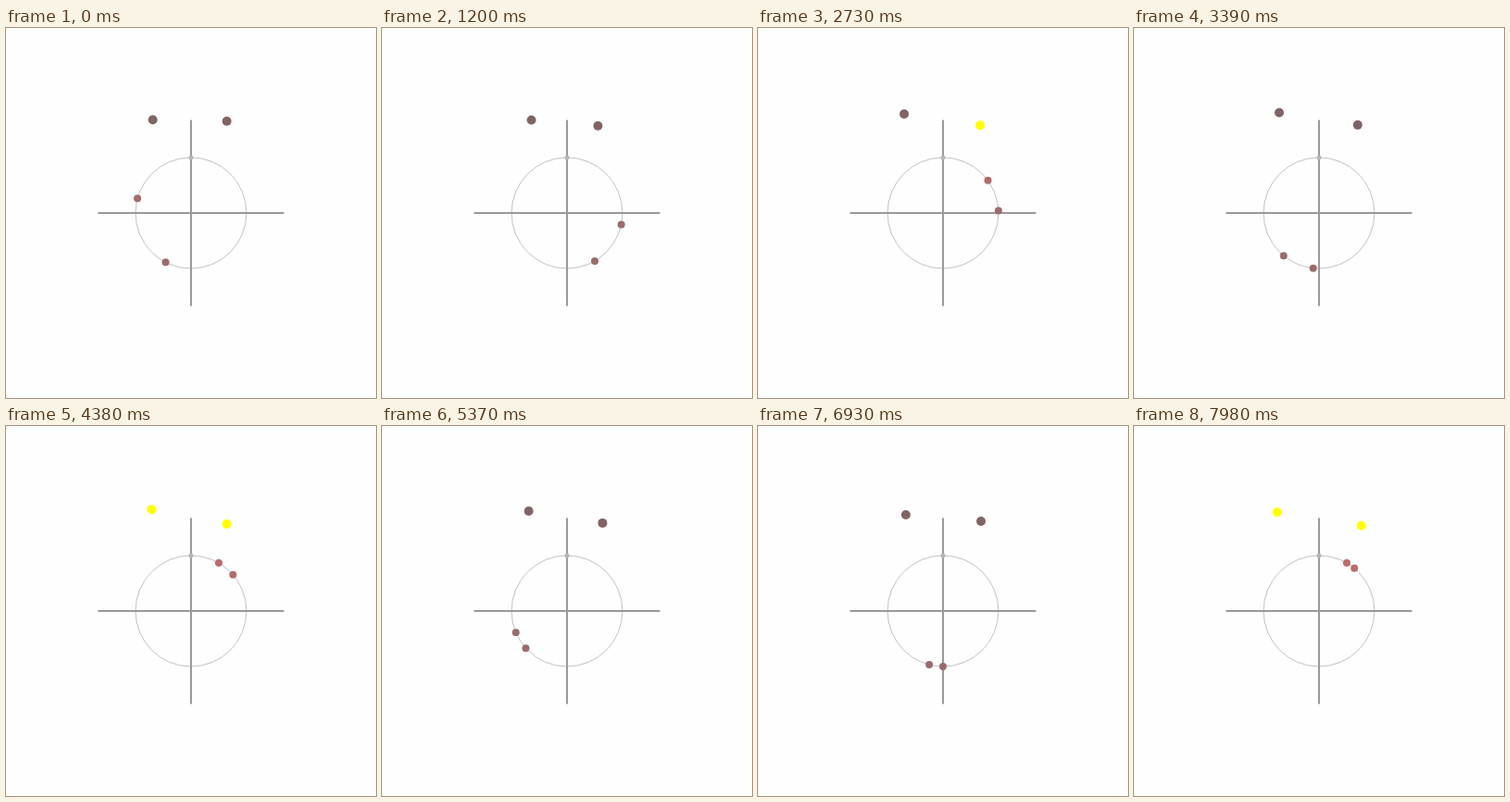
An HTML page for the animation above (8 s loop, 400 px wide and 400 px high).

```html
<!DOCTYPE html>
<html>
<head>
<meta charset="utf-8">
<title>Coupled oscillators</title>
<style>
html, body { margin: 0; width: 100%; height: 100%; overflow: hidden; background: #fefefe; }
svg { display: block; width: 100vw; height: 100vh; }
</style>
</head>
<body>
<svg viewBox="0 0 400 400">
  <g fill="none">
    <circle cx="200" cy="200" r="60" stroke="#c2c2c2"/>
    <path d="M99.5 200H300.5M200 99.5V300.5" stroke="#999" stroke-width="2"/>
  </g>
  <circle cx="200" cy="140" r="2.5" fill="#b8b4b4"/>
  <g id="markers"></g>
  <g id="lamps"></g>
</svg>
<script>
const LOOP = 8000, TICK = 30, SPEED = 6, PULL = 0.2, FLASH = 60;

// Evenly spaced poses of each lamp's slow wander
const wander = [
  [[158.7, 99.3], [162, 99.5], [157, 91.5], [157.5, 90], [161.5, 97], [154.8, 93.2]],
  [[238.7, 100.8], [232.5, 106.5], [242, 104.8], [238, 106.2], [239.5, 101.5], [245.8, 107.7]]
];

// Each oscillator that reaches the top restarts and pulls the other towards it.
function simulate(phase) {
  const states = [];
  for (let n = 0; n * TICK < LOOP; n++) {
    states.push([...phase]);
    phase = phase.map(p => p + SPEED);
    phase.forEach((p, i) => {
      if (p < 360) return;
      phase[i] = 0;
      const other = 1 - i, q = phase[other];
      phase[other] += PULL * (q > 180 ? 360 - q : -q);
    });
  }
  return states;
}

function along(poses, progress) {
  const place = progress * (poses.length - 1), k = Math.floor(place);
  const ease = (1 - Math.cos((place - k) * Math.PI)) / 2;
  return poses[k].map((v, axis) => v + (poses[k + 1][axis] - v) * ease);
}

function addDots(id, r) {
  return wander.map(() => {
    const dot = document.createElementNS('http://www.w3.org/2000/svg', 'circle');
    dot.setAttribute('r', r);
    return document.getElementById(id).appendChild(dot);
  });
}

function paint(dot, x, y, fill) {
  dot.setAttribute('cx', x);
  dot.setAttribute('cy', y);
  dot.setAttribute('fill', fill);
}

const states = simulate([285.2, 207.2]);
const markers = addDots('markers', 4), lamps = addDots('lamps', 5);
const start = performance.now();

function draw(now) {
  const n = Math.floor(Math.max(0, now - start) % LOOP / TICK);
  states[n].forEach((phase, i) => {
    const a = phase * Math.PI / 180, x = Math.sin(a), y = Math.cos(a);
    const red = 154 + 38 * Math.max(0, y);
    paint(markers[i], 200 + 60 * x, 200 - 60 * y, `rgb(${red}, 108, 108)`);
    paint(lamps[i], ...along(wander[i], n * TICK / LOOP), phase < FLASH ? '#ff0' : '#806464');
  });
  requestAnimationFrame(draw);
}
draw(start);
</script>
</body>
</html>
```
